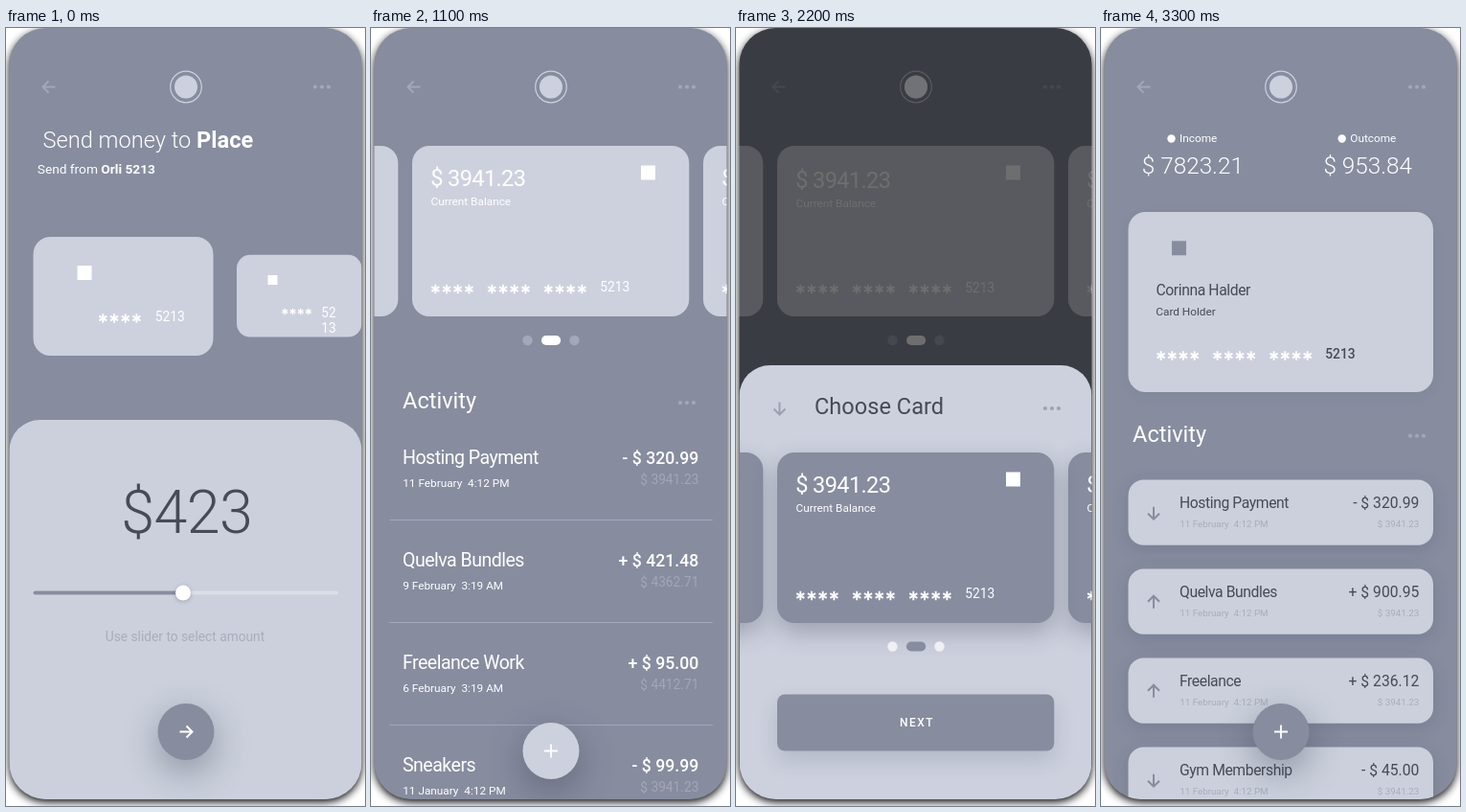
These frames come from a looping animation (375 px wide and 812 px high, 4400 ms). An HTML page with a canvas:

```html
<!DOCTYPE html>
<html lang="en">
<head>
<meta charset="utf-8">
<title>Wallet</title>
<style>
  html, body { margin: 0; width: 100%; height: 100%; overflow: hidden; background: #fff; }
  canvas { display: block; width: 375px; height: 812px; }
</style>
</head>
<body>
<canvas id="stage"></canvas>
<script>
const W = 375, H = 812, STEP = 1100;
const SLATE = '#878c9f', PALE = '#cdd1de', SHEET = '#cbd0dc', INK = '#474a57',
      MUTED = '#a3a7b8', FAINT = '#a8adbb', WHITE = '#fff';
const MASK = '5213', BALANCE = '$ 3941.23', FEB = '11 February  4:12 PM';

const canvas = document.getElementById('stage');
const ctx = canvas.getContext('2d');
const dpr = window.devicePixelRatio || 1;
canvas.width = W * dpr;
canvas.height = H * dpr;

function shadow(alpha, blur, dy) {
  ctx.shadowColor = `rgba(50,54,72,${alpha})`;
  ctx.shadowBlur = blur * dpr;
  ctx.shadowOffsetY = dy * dpr;
}

function paint(color, shade) {
  ctx.save();
  if (shade) shadow(...shade);
  ctx.fillStyle = color;
  ctx.fill();
  ctx.restore();
}

function box(x, y, w, h, r, color, shade) {
  ctx.beginPath();
  ctx.roundRect(x, y, w, h, r);
  paint(color, shade);
}

function disc(x, y, r, color, shade) {
  ctx.beginPath();
  ctx.arc(x, y, r, 0, Math.PI * 2);
  paint(color, shade);
}

function text(str, x, y, size, color, { weight = 400, align = 'left', gap = 0 } = {}) {
  ctx.font = `${weight} ${size}px Roboto, sans-serif`;
  ctx.letterSpacing = gap + 'px';
  ctx.textAlign = align;
  ctx.fillStyle = color;
  ctx.fillText(str, x, y);
  return ctx.measureText(str).width;
}

function lines(color, width, ...paths) {
  ctx.strokeStyle = color;
  ctx.lineWidth = width;
  ctx.beginPath();
  for (const [start, ...rest] of paths) {
    ctx.moveTo(...start);
    rest.forEach(p => ctx.lineTo(...p));
  }
  ctx.stroke();
}

function arrow(x, y, turns, color, size = 6.5) {
  ctx.save();
  ctx.translate(x, y);
  ctx.rotate(turns * Math.PI / 2);
  lines(color, 2, [[-size, 0], [size, 0]], [[0.5, -size + 0.5], [size, 0], [0.5, size - 0.5]]);
  ctx.restore();
}

function plus(x, y) {
  lines(WHITE, 1.8, [[x - 7, y], [x + 7, y]], [[x, y - 7], [x, y + 7]]);
}

function more(y, color = MUTED) {
  for (let i = -1; i < 2; i++) disc(330 + i * 7, y, 2.1, color);
}

// A row of four six-armed stars, repeated in groups.
function stars(x, y, groups = 1, scale = 1) {
  for (let g = 0; g < groups; g++) {
    for (let i = 0; i < 4; i++) {
      const cx = x + g * 59 + (4.8 + i * 11.7) * scale, r = 4.7 * scale;
      for (let k = 0; k < 3; k++) {
        const a = Math.PI / 2 + k * Math.PI / 3, dx = Math.cos(a) * r, dy = Math.sin(a) * r;
        lines(WHITE, 1.9 * scale, [[cx - dx, y - dy], [cx + dx, y + dy]]);
      }
    }
  }
}

function badge(cx, cy, size, color = WHITE) {
  box(cx - size / 2, cy - size / 2, size, size, 0, color);
}

function header() {
  arrow(45, 61.5, 2, MUTED);
  ctx.strokeStyle = PALE;
  ctx.lineWidth = 1.2;
  ctx.beginPath();
  ctx.arc(188, 61.5, 16.3, 0, Math.PI * 2);
  ctx.stroke();
  disc(188, 61.5, 12, PALE);
  more(61.5);
}

function balanceCards(y, color, shade, nudge = 0) {
  for (const dx of [-304, 304, 0]) {
    const x = 43 + dx;
    box(x, y, 289.3, 178, 18, color, shade);
    text(BALANCE, x + 19.3, y + 41.5 + nudge, 23.6, WHITE, { gap: -0.65 });
    text('Current Balance', x + 19.5, y + 61.8 + nudge, 11.8, WHITE);
    badge(x + 246.5, y + 28, 15);
    stars(x + 19.5, y + 149.5, 3);
    text(MASK, x + 196.2, y + 152.3 + nudge / 2, 13.8, WHITE);
  }
}

function pager(y, dot, pill) {
  disc(163.5, y, 5.2, dot);
  disc(212.5, y, 5.2, dot);
  box(178, y - 5, 20.2, 10, 5, pill);
}

function fab(y, color) {
  disc(188, y, 29.5, color, [0.4, 36, 12]);
}

function sendScreen() {
  header();
  const w = text('Send money to ', 38.6, 124.6, 23.6, WHITE, { weight: 300 });
  text('Place', 38.6 + w, 124.6, 23.6, WHITE, { weight: 700 });
  const v = text('Send from ', 32.8, 152, 13.7, WHITE);
  text('Orli ' + MASK, 32.8 + v, 152, 13.7, WHITE, { weight: 700 });

  box(28.5, 218, 188, 124, 18, PALE);
  badge(82, 255.5, 15);
  stars(96.5, 303, 1);
  text(MASK, 155.7, 306, 13.8, WHITE);

  box(241, 236.8, 130.5, 85.8, 14, PALE);
  badge(278.5, 263, 10);
  stars(288, 296, 1, 0.7);
  text(MASK.slice(0, 2), 329.3, 302, 13.8, WHITE);
  text(MASK.slice(2), 329.3, 318, 13.8, WHITE);

  box(3.5, 409, 368, 420, 32, SHEET);
  text('$423', 188.8, 527.2, 62.8, INK, { weight: 300, align: 'center', gap: -0.6 });
  box(28.5, 587.5, 318.5, 4, 2, '#dcdfe7');
  box(28.5, 587.5, 156.5, 4, 2, SLATE);
  disc(185, 589.5, 8, WHITE, [0.3, 4, 1]);
  text('Use slider to select amount', 187, 639.8, 13.75, FAINT, { align: 'center' });
  fab(734.5, SLATE);
  arrow(188, 734.5, 0, WHITE);
}

const payments = [
  ['Hosting Payment', FEB, '- $ 320.99', BALANCE],
  ['Quelva Bundles', '9 February  3:19 AM', '+ $ 421.48', '$ 4362.71'],
  ['Freelance Work', '6 February  3:19 AM', '+ $ 95.00', '$ 4412.71'],
  ['Sneakers', '11 January  4:12 PM', '- $ 99.99', BALANCE]
];

function activityHead(y) {
  text('Activity', 33.1, y, 23.5, WHITE);
  more(y - 6.3);
}

function balanceScreen() {
  header();
  balanceCards(123, PALE);
  pager(326, MUTED, WHITE);
  activityHead(397.4);
  payments.forEach(([name, date, sum, left], i) => {
    const y = 454.6 + i * 107;
    text(name, 33, y, 19.6, WHITE, { gap: -0.54 });
    text(date, 33.2, y + 24, 11.8, WHITE);
    text(sum, 342.4, y, 17.7, WHITE, { weight: 500, align: 'right' });
    text(left, 342.4, y + 21.7, 13.75, MUTED, { align: 'right' });
    box(19, y + 58.4, 338, 1, 0, MUTED);
  });
  fab(754.5, PALE);
  plus(188, 754.5);
}

function chooseScreen() {
  header();
  balanceCards(123, PALE, null, 2);
  pager(326, MUTED, WHITE);
  box(0, 0, W, H, 0, 'rgba(0,0,0,0.57)');
  disc(188, 61.5, 12, '#707276');

  box(3.5, 352, 368, 480, 32, PALE);
  arrow(45.5, 397, 1, '#9da1b0');
  text('Choose Card', 82, 403, 23.6, INK);
  more(397, '#9da1b0');
  balanceCards(443, SLATE, [0.3, 24, 10]);
  pager(645.5, '#eff0f5', SLATE);
  box(43, 695.5, 289.3, 59, 8, SLATE, [0.16, 22, 10]);
  text('NEXT', 189, 729, 12, WHITE, { weight: 500, align: 'center', gap: 1.5 });
}

const entries = [
  ['Hosting Payment', '- $ 320.99', 1],
  ['Quelva Bundles', '+ $ 900.95', 3],
  ['Freelance', '+ $ 236.12', 3],
  ['Gym Membership', '- $ 45.00', 1]
];

function total(label, sum, dotX, sumX) {
  disc(dotX, 115.5, 4.2, WHITE);
  text(label, dotX + 8.6, 119, 11.8, WHITE);
  text(sum, sumX, 152, 24.3, WHITE, { weight: 300 });
}

function overviewScreen() {
  header();
  total('Income', '$ 7823.21', 73.5, 42.8);
  total('Outcome', '$ 953.84', 251.7, 232.4);

  box(28.5, 192, 318.5, 188, 18, SHEET, [0.05, 14, 4]);
  badge(81.5, 229.7, 15, SLATE);
  text('Corinna Halder', 57.5, 278.5, 15.7, INK, { gap: -0.4 });
  text('Card Holder', 57.3, 300.1, 11.8, INK);
  stars(57.8, 342, 3);
  text(MASK, 234.2, 344.8, 13.8, INK, { weight: 500 });

  activityHead(432);
  entries.forEach(([name, sum, dir], i) => {
    const y = 471.5 + i * 93;
    box(28.5, y, 318.5, 68.3, 16, SHEET, [0.15, 18, 5]);
    arrow(55, y + 34.7, dir, SLATE);
    text(name, 82, y + 29.4, 15.7, INK, { gap: -0.4 });
    text(FEB, 82.2, y + 49.5, 9.8, FAINT);
    text(sum, 332.3, y + 29.4, 15.7, INK, { align: 'right' });
    text(BALANCE, 332.3, y + 49.5, 9.8, FAINT, { align: 'right' });
  });
  fab(734.5, SLATE);
  plus(188, 734.5);
}

const screens = [sendScreen, balanceScreen, chooseScreen, overviewScreen];

function draw(ms) {
  ctx.setTransform(dpr, 0, 0, dpr, 0, 0);
  box(0, 0, W, H, 0, WHITE);
  ctx.save();
  ctx.shadowColor = 'rgba(0,0,0,0.95)';
  ctx.shadowBlur = 8 * dpr;
  ctx.shadowOffsetY = 3 * dpr;
  ctx.beginPath();
  ctx.roundRect(3.5, 0, 368, 805, 38);
  ctx.fillStyle = SLATE;
  ctx.fill();
  ctx.restore();

  ctx.save();
  ctx.clip();
  screens[Math.floor(ms / STEP) % screens.length]();
  ctx.restore();
}

const start = performance.now();
function tick() {
  draw(performance.now() - start);
  requestAnimationFrame(tick);
}
tick();
</script>
</body>
</html>
```
